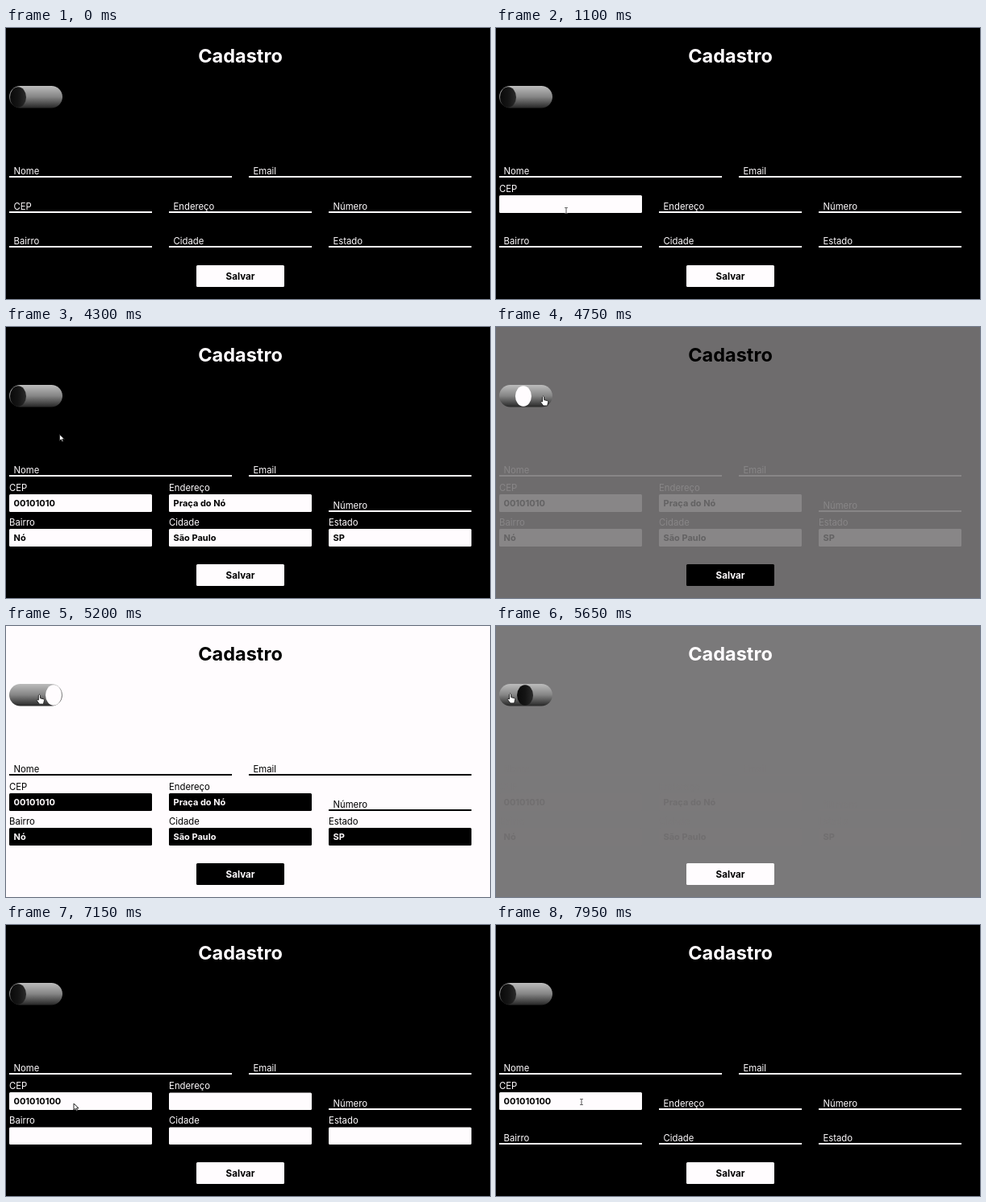
Write an HTML page with a canvas that moves like this. It is 600x337 px and loops after 8 s.

```html
<!DOCTYPE html>
<html lang="pt-BR">
<head>
<meta charset="utf-8">
<title>Cadastro</title>
<style>
html, body { margin: 0; width: 100%; height: 100%; overflow: hidden; background: #000; }
canvas { display: block; width: 600px; height: 337px; }
</style>
</head>
<body>
<canvas id="stage"></canvas>
<script>
const W = 600, H = 337, LOOP = 8000;
const canvas = document.getElementById('stage');
const ctx = canvas.getContext('2d');
const dpr = window.devicePixelRatio || 1;
canvas.width = W * dpr;
canvas.height = H * dpr;

const FONT = 'Inter, "Open Sans", sans-serif';
const CEP = '00101010';
const KEYS = [1440, 1590, 1690, 1790, 1990, 2140, 2240, 2375];
const CEP_FOCUS = 790, NEXT_FOCUS = 2900, FILLED = 3250;
const TO_LIGHT = 4686, TO_DARK = 5575, FADE = 250;
const REFOCUS = 6560, EXTRA_KEY = 6780, BLUR = 6980, CLEARED = 7140;
const BLINK = 270;

// label, left, bottom, width, float start, float end, autofilled value
const FIELDS = [
  ['Nome', 4, 186, 276],
  ['Email', 301, 186, 276],
  ['CEP', 4, 230, 177, CEP_FOCUS, Infinity],
  ['Endereço', 202, 230, 177, NEXT_FOCUS, CLEARED, 'Praça do Nó'],
  ['Número', 400, 230, 177],
  ['Bairro', 4, 273, 177, FILLED, CLEARED, 'Nó'],
  ['Cidade', 202, 273, 177, FILLED, CLEARED, 'São Paulo'],
  ['Estado', 400, 273, 177, FILLED, CLEARED, 'SP']
];

// time, x, y
const PATH = [
  [3920, 87, 227], [4550, 60, 92], [5000, 60, 92], [5450, 19, 90],
  [5850, 19, 90], [6650, 87, 227], [7500, 87, 227], [7950, 106, 220]
];
const ARROW = new Path2D('M-3-5v8l2-1.7 1.5 3 1.3-.7-1.4-2.8h2.7z');
const HAND = new Path2D('M-2.5-5q1.2-2 2.2 0v3.6l4 1q1.1.4 1 2l-1 4.4h-5l-3.4-4.5q-.2-1.8 2.2-.6z');

// CSS "ease" curve
function ease(x) {
  if (x <= 0) return 0;
  if (x >= 1) return 1;
  let lo = 0, hi = 1, s;
  for (let i = 0; i < 20; i++) {
    s = (lo + hi) / 2;
    const bx = 0.75 * s * (1 - s) + s * s * s;
    if (bx < x) lo = s; else hi = s;
  }
  return 0.3 * s * (1 - s) * (1 - s) + 3 * s * s * (1 - s) + s * s * s;
}

// black (0) to the slightly pink white (1) of the theme
const shade = v => `rgb(${[255, 252, 254].map(c => Math.round(c * v))})`;

function text(str, x, y, size, weight, color, align = 'left') {
  ctx.font = `${weight} ${size}px ${FONT}`;
  ctx.textAlign = align;
  ctx.fillStyle = color;
  ctx.fillText(str, x, y);
}

function box(x, y, w, h, r, color) {
  ctx.fillStyle = color;
  ctx.beginPath();
  ctx.roundRect(x, y, w, h, r);
  ctx.fill();
}

function gradient(x0, y0, x1, y1, ...colors) {
  const g = ctx.createLinearGradient(x0, y0, x1, y1);
  colors.forEach((c, i) => g.addColorStop(i / (colors.length - 1), c));
  return g;
}

function cepText(t) {
  const typed = CEP.slice(0, KEYS.filter(k => t >= k).length);
  return t >= EXTRA_KEY ? typed + '0' : typed;
}

function caretOn(t, label) {
  let since;
  if (label === 'CEP') {
    if (t >= CEP_FOCUS && t < NEXT_FOCUS) {
      if (t >= KEYS[0] && t < KEYS[7]) return true;
      since = t < KEYS[0] ? CEP_FOCUS : KEYS[7];
    } else if (t >= REFOCUS && t < BLUR) {
      since = t < EXTRA_KEY ? REFOCUS : EXTRA_KEY;
    } else return false;
  } else if (label === 'Endereço' && t >= NEXT_FOCUS && t < TO_LIGHT) {
    since = NEXT_FOCUS;
  } else return false;
  return Math.floor((t - since) / BLINK) % 2 === 0;
}

function drawField(t, fg, ink, [label, x, bottom, w, from, to, fill]) {
  const f = from ? ease((t - from) / 300) * (1 - ease((t - to) / 300)) : 0;
  const h = 2 + 20 * f;
  box(x, bottom - h, w, h, f > 0.2 ? 1.5 : 0, fg);
  text(label, x + 5.5 - 5.5 * f, bottom - 4 - 22 * f, 11.3, 400, fg);

  const value = label === 'CEP' ? cepText(t)
    : fill && t >= FILLED && t < CLEARED ? fill : '';
  text(value, x + 5.5, bottom - 7, 11, 700, ink);
  if (caretOn(t, label)) {
    ctx.fillStyle = '#555';
    ctx.fillRect(x + 5.5 + ctx.measureText(value).width, bottom - 18, 1, 15);
  }
}

function drawToggle(light, w) {
  box(4, 72, 66, 27.5, 13.75, gradient(0, 72, 0, 99, '#bcbcbc', '#868686', '#2a2a2a'));
  const x = 15 + 44 * w;
  ctx.beginPath();
  ctx.ellipse(x, 86, 10, 12.7, 0, 0, 7);
  ctx.fillStyle = light ? shade(1) : gradient(x - 10, 86, x + 10, 86, '#0a0a0a', '#141414', '#2a2a2a');
  ctx.fill();
}

function cursorAt(t) {
  const i = PATH.findIndex(p => p[0] > t);
  if (i < 0) return PATH.at(-1).slice(1);
  if (i === 0) return PATH[0].slice(1);
  const [t0, x0, y0] = PATH[i - 1], [t1, x1, y1] = PATH[i];
  const u = (t - t0) / (t1 - t0), s = u * u * (3 - 2 * u);
  return [x0 + (x1 - x0) * s, y0 + (y1 - y0) * s];
}

function drawCursor(t) {
  if (t < CEP_FOCUS) return;
  const [x, y] = cursorAt(t);
  const inToggle = x > 4 && x < 70 && y > 72 && y < 100;
  const inCep = x > 4 && x < 181 && y > 208 && y < 230;
  const waiting = t >= BLUR && t < 7500;
  ctx.save();
  ctx.translate(x, y);
  if (inCep && !waiting) {
    ctx.fillStyle = '#555';
    ctx.fillRect(-0.5, -4, 1, 8);
    ctx.fillRect(-2, -4, 4, 0.8);
    ctx.fillRect(-2, 3.2, 4, 0.8);
  } else {
    const shape = inToggle ? HAND : ARROW;
    ctx.lineWidth = 1;
    ctx.strokeStyle = '#222';
    ctx.fillStyle = '#fff';
    ctx.fill(shape);
    ctx.stroke(shape);
  }
  ctx.restore();
}

function draw(t) {
  const light = t >= TO_LIGHT && t < TO_DARK;
  const w = ease((t - TO_LIGHT) / FADE) - ease((t - TO_DARK) / FADE);
  const fg = shade((1 - w) ** 1.12);
  const ink = shade(w ** 1.12);
  const strong = shade(light ? 0 : 1);

  ctx.setTransform(dpr, 0, 0, dpr, 0, 0);
  ctx.fillStyle = shade(w);
  ctx.fillRect(0, 0, W, H);
  text('Cadastro', 290.5, 42.5, 23.5, 700, strong, 'center');
  drawToggle(light, w);
  FIELDS.forEach(f => drawField(t, fg, ink, f));
  box(236, 295, 109, 27, 1.5, strong);
  text('Salvar', 290.5, 312.5, 11.6, 700, shade(light ? 1 : 0), 'center');
  drawCursor(t);
}

const start = performance.now();
function tick() {
  draw((performance.now() - start) % LOOP);
  requestAnimationFrame(tick);
}
tick();
</script>
</body>
</html>
```
